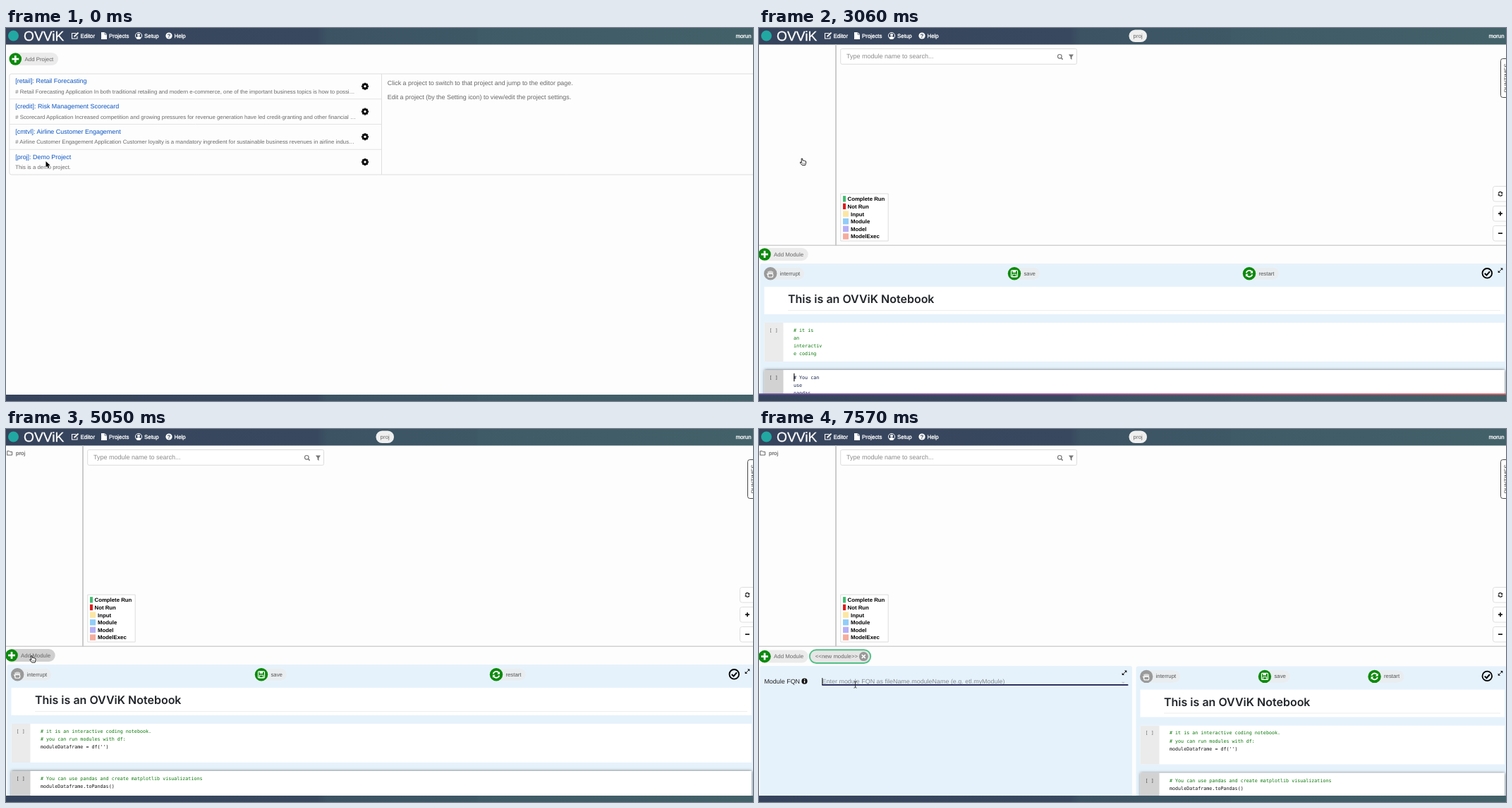
Recreate the animation shown at these times as an HTML page with a canvas. Size 1059 by 529 pixels, loop 8 s.

```html
<!DOCTYPE html>
<html lang="en">
<head>
<meta charset="utf-8">
<title>Project editor</title>
<style>
html, body { margin: 0; width: 100%; height: 100%; overflow: hidden; background: #fdfdfd; }
canvas { display: block; width: 1059px; height: 529px; }
</style>
</head>
<body>
<canvas id="stage"></canvas>
<script>
const W = 1059, H = 529, LOOP = 8000;
const SANS = '"Liberation Sans", sans-serif';
const MONO = '"DejaVu Sans Mono", monospace';
const BRAND = 'OVViK';
const GREEN = '#0b8a0b', PAGE = '#fdfdfd', PANEL = '#e6f2fb';

const canvas = document.getElementById('stage');
const c = canvas.getContext('2d');
const dpr = window.devicePixelRatio || 1;
canvas.width = W * dpr;
canvas.height = H * dpr;

// --- drawing helpers ---
function text(s, x, y, size, color, opt = {}) {
  c.font = `${opt.weight || 400} ${size}px ${opt.family || SANS}`;
  c.textAlign = opt.align || 'left';
  c.fillStyle = color;
  c.fillText(s, x, y);
  if (opt.medium) {
    c.strokeStyle = color;
    c.lineWidth = 0.3;
    c.strokeText(s, x, y);
  }
}
function rect(x, y, w, h, color) {
  c.fillStyle = color;
  c.fillRect(x, y, w, h);
}
function box(x, y, w, h, r, fill, stroke, lw = 1) {
  c.beginPath();
  c.roundRect(x, y, w, h, r);
  if (fill) { c.fillStyle = fill; c.fill(); }
  if (stroke) { c.strokeStyle = stroke; c.lineWidth = lw; c.stroke(); }
}
function disc(x, y, r, color) {
  c.beginPath();
  c.arc(x, y, r, 0, 7);
  c.fillStyle = color;
  c.fill();
}
function arc(x, y, r, color, lw, from = 0, to = Math.PI * 2) {
  c.beginPath();
  c.arc(x, y, r, from, to);
  c.strokeStyle = color;
  c.lineWidth = lw;
  c.stroke();
}
function line(points, color, lw = 1) {
  c.beginPath();
  points.forEach(([x, y], i) => i ? c.lineTo(x, y) : c.moveTo(x, y));
  c.strokeStyle = color;
  c.lineWidth = lw;
  c.stroke();
}
function poly(points, color) {
  c.beginPath();
  points.forEach(([x, y]) => c.lineTo(x, y));
  c.closePath();
  c.fillStyle = color;
  c.fill();
}
function at(x, y, draw) {
  c.save();
  c.translate(x, y);
  draw();
  c.restore();
}

// --- icons ---
function plus(x, y, r, color, lw) {
  line([[x - r, y], [x + r, y]], color, lw);
  line([[x, y - r], [x, y + r]], color, lw);
}
function gear(x, y, hole) {
  at(x, y, () => {
    for (let i = 0; i < 4; i++) {
      rect(-1.3, -5, 2.6, 10, '#000');
      c.rotate(Math.PI / 4);
    }
    disc(0, 0, 3.8, '#000');
    disc(0, 0, 1.7, hole);
  });
}
function refresh(x, y, r, color, lw) {
  at(x, y, () => {
    for (let i = 0; i < 2; i++) {
      arc(0, 0, r, color, lw, Math.PI * 1.08, Math.PI * 1.8);
      poly([[r * 1.15, -r], [r * 1.15, -r * .1], [r * .25, -r * .1]], color);
      c.rotate(Math.PI);
    }
  });
}
function expand(x, y) {
  line([[x - 2.5, y + 2.5], [x + 2.5, y - 2.5]], '#111', 1);
  poly([[x + 3.3, y - 3.3], [x + 3.3, y], [x, y - 3.3]], '#111');
  poly([[x - 3.3, y + 3.3], [x - 3.3, y], [x, y + 3.3]], '#111');
}
function hand(x, y) {
  at(x, y, () => {
    for (let i = 0; i < 4; i++) line([[-3 + i * 2, -4 + Math.abs(i - 1.5) * .6], [-3 + i * 2, 1]], '#fff', 1.2);
    line([[-5, 0], [-3, 2.5]], '#fff', 1.2);
    box(-3.6, 0, 7.2, 5, 2, null, '#fff', 1.1);
  });
}
function floppy(x, y) {
  box(x - 4.5, y - 4.5, 9, 9, 1, null, '#fff', 1.2);
  rect(x - 2.5, y - 4.5, 4.5, 3, '#fff');
  box(x - 2.6, y + .8, 5.2, 3.7, 0, null, '#fff', 1);
}

// --- pointers, placed by their hot spot ---
const pointers = {
  arrow() {
    c.beginPath();
    [[0, 0], [0, 8.6], [2, 6.8], [3.4, 9.8], [4.8, 9.1], [3.5, 6.3], [6.2, 6.1]].forEach(p => c.lineTo(...p));
    c.closePath();
    c.strokeStyle = '#fff';
    c.lineWidth = 1;
    c.stroke();
    c.fillStyle = '#000';
    c.fill();
  },
  hand() {
    c.beginPath();
    [[-.9, .2], [.6, .2], [1, 3], [3.2, 3.2], [5.4, 4], [5.6, 6], [4.6, 9.6], [.2, 9.6], [-2.6, 6.2], [-2.4, 5], [-.6, 6]]
      .forEach(p => c.lineTo(...p));
    c.closePath();
    c.fillStyle = '#fff';
    c.fill();
    c.strokeStyle = '#111';
    c.lineWidth = .9;
    c.lineJoin = 'round';
    c.stroke();
    for (let i = 0; i < 3; i++) line([[.6 + i * 1.4, 6], [.6 + i * 1.4, 8.2]], '#444', .5);
  },
  beam() {
    line([[0, -4], [0, 4]], '#222', .9);
    line([[-2, -4.8], [0, -4], [2, -4.8]], '#222', .8);
    line([[-2, 4.8], [0, 4], [2, 4.8]], '#222', .8);
  }
};

// --- timing ---
const lerp = (a, b, k) => a + (b - a) * k;
const ease = k => k * k * (3 - 2 * k);
const stepIndex = (t, times) => times.filter(s => t >= s).length;
const BAR_STEPS = [3810, 4010, 4160, 4310, 4460, 4600, 4750];
const LINK = [61, 185], ADD = [36.5, 321.5], FIELD = [136.5, 362.5];

function pointerAt(t) {
  if (t < 1560) return [56.5, 189];
  if (t < 2160) {
    const k = (Math.floor((t - 1560) / 150) + 1) / 5;
    return [lerp(56.5, 61, k), lerp(189, 185, k) - 37 * Math.sin(Math.PI * k)];
  }
  if (t < 3810) return LINK;
  if (t < 5500) {
    const k = ease(Math.max(0, stepIndex(t, BAR_STEPS) - 1) / 6);
    return LINK.map((v, i) => lerp(v, ADD[i], k));
  }
  const k = ease(Math.min(1, Math.floor((t - 5500) / 146.6) / 6));
  return ADD.map((v, i) => lerp(v, FIELD[i], k));
}

// --- shared bars ---
function barFill() {
  const g = c.createLinearGradient(0, 0, W, 0);
  [[0, '#36435c'], [.417, '#38495f'], [.43, '#3c5363'], [.63, '#3e5866'], [.632, '#3f5b67'], [1, '#436169']]
    .forEach(s => g.addColorStop(...s));
  return g;
}
function chrome() {
  const fill = barFill();
  rect(0, 0, W, 23.5, fill);
  rect(0, 520, W, 9, fill);
  disc(10.5, 11, 7.5, '#22a8a3');
  text(BRAND, 25, 17.7, 19.2, '#fff', { medium: true });
  const nav = [['Editor', 105.5], ['Projects', 146], ['Setup', 196], ['Help', 238.5]];
  nav.forEach(([s, x]) => text(s, x, 14, 7.9, '#fff', { medium: true }));
  line([[99.5, 7.5], [93.5, 7.5], [93.5, 15], [101, 15], [101, 11.5]], '#fff', 1.1);
  line([[96.5, 12.3], [102.5, 6.6]], '#fff', 2);
  poly([[135, 6], [140, 6], [143, 9], [143, 16], [135, 16]], '#fff');
  line([[140, 6], [140, 9.2], [143, 9.2]], '#3a4d60', .7);
  arc(188, 11, 4.6, '#fff', 1);
  disc(188, 9.7, 2, '#fff');
  c.beginPath();
  c.ellipse(188, 14, 3.2, 1.9, 0, 0, 7);
  c.fill();
  disc(231, 11, 4.6, '#fff');
  text('?', 231, 14, 8, '#394a60', { weight: 700, align: 'center' });
  text('morun', 1056.5, 14, 7.8, '#fff', { medium: true, align: 'right' });
}
function addPill(x, y, end, label, labelX, fill) {
  box(x - 8, y - 9, end - x + 8, 18, 9, fill);
  disc(x, y, 8.8, GREEN);
  plus(x, y, 4.9, '#fff', 2.7);
  text(label, labelX, y + 2.7, 7.9, '#666');
}

// --- project list ---
const projects = [
  ['[retail]: Retail Forecasting', 101.5, '# Retail Forecasting Application In both traditional retailing and modern e-commerce, one of the important business topics is how to possi…'],
  ['[credit]: Risk Management Scorecard', 147, '# Scorecard Application Increased competition and growing pressures for revenue generation have led credit-granting and other financial …'],
  ['[cmtvl]: Airline Customer Engagement', 150, '# Airline Customer Engagement Application Customer loyalty is a mandatory ingredient for sustainable business revenues in airline indus…'],
  ['[proj]: Demo Project', 79, 'This is a demo project.']
];
function listPage(t, [px, py]) {
  addPill(13.3, 44, 74, 'Add Project', 26.5, '#ebebeb');
  box(4.8, 65, 1060, 143, 3, null, '#dedede');
  let kind = 'arrow';
  projects.forEach(([title, width, note], i) => {
    const y = 65 + i * 35.75;
    const over = t >= 150 && py >= y && py < y + 35.75;
    const link = over && py > y + 4 && py < y + 15 && px < 13 + width;
    if (over) rect(5.5, y + .5, 526.5, 34.9, '#f2f7fb');
    if (i) line([[5, y], [532, y]], '#e3e3e3');
    text(title, 13.2, y + 13.4, 8.95, '#0b55c4');
    if (link) {
      kind = 'hand';
      rect(13.2, y + 14.3, width - .5, .8, '#0b55c4');
    }
    text(note, 13.2, y + 27.8, 7.82, '#6a6a6a');
    gear(509, y + 17.8, over ? '#f2f7fb' : PAGE);
  });
  line([[532.5, 65], [532.5, 208]], '#dedede');
  text('Click a project to switch to that project and jump to the editor page.', 540.8, 81, 8.92, '#666');
  text('Edit a project (by the Setting icon) to view/edit the project settings.', 540.8, 101.2, 8.92, '#666');
  return kind;
}

// --- editor ---
const legend = [['Complete Run', '#43bd72'], ['Not Run', '#dd1c1c'], ['Input', '#fce6a4'],
  ['Module', '#92ccf8'], ['Model', '#b5b0f6'], ['ModelExec', '#f5ac9d']];

function graphArea(t) {
  box(524.5, 2.5, 25.5, 17.5, 8.7, '#efefef');
  text('proj', 537.2, 14, 7.9, '#666', { align: 'center' });
  rect(108, 23.5, 2, 285, '#cbcbcb');
  rect(0, 307.6, W, 1.2, '#c6c6c6');
  if (t >= 3510) {
    line([[1.8, 37], [1.8, 31.2], [4.5, 31.2], [5.3, 32.3], [8.6, 32.3], [8.6, 37], [1.4, 37]], '#555', .9);
    text('proj', 14, 36.8, 7.9, '#333');
  }
  box(115.7, 29.5, 334.8, 21.8, 2, '#fff', '#dcdcdc');
  text('Type module name to search...', 124, 43.2, 9, '#8a8a8a');
  arc(426.3, 40.3, 2.8, '#777', 1.2);
  line([[428.3, 42.3], [430.6, 44.6]], '#777', 1.5);
  poly([[439, 37.5], [446, 37.5], [443.5, 41], [443.5, 45], [441.6, 43.4], [441.6, 41]], '#777');
  box(1051.5, 43.5, 14, 55, 3, '#fff', '#444');
  at(1062, 71, () => {
    c.rotate(-Math.PI / 2);
    text('RUNTIMES', 0, 0, 7.8, '#333', { align: 'center' });
  });
  for (let i = 0; i < 3; i++) box(1040.5, 224.5 + i * 28, 30, 21.5, 3, '#fff', '#dedede');
  refresh(1051, 235.3, 2.8, '#111', 1.2);
  plus(1051, 263.2, 3, '#111', 1.7);
  line([[1048, 291.2], [1054, 291.2]], '#111', 1.7);
  box(115.8, 235, 67.4, 67, 0, '#fff', '#dcdcdc');
  legend.forEach(([name, color], i) => {
    const y = 242.3 + i * 10.65;
    rect(119, y - 4.2, i < 2 ? 4 : 8, 8.4, color);
    text(name, i < 2 ? 125.5 : 130, y + 2.9, 7.8, '#000', { weight: 700 });
  });
}

function tool(x, y, end, label, color, icon) {
  box(x - 8, y - 8.5, end - x + 8, 17, 8.5, '#e9edf0');
  disc(x, y, 9.2, color);
  icon(x, y);
  text(label, x + 13.4, y + 2.5, 7.8, '#555');
}
function code(lines, x, y) {
  lines.forEach(([s, color], i) => text(s, x, y + i * 11.1, 6.7, color, { family: MONO }));
}
const COMMENT = '#0a780a', INK = '#111', NAVY = '#14204a';
const narrow = [
  ['# it is', 'an', 'interactiv', 'e coding'].map(s => [s, COMMENT]),
  ['# You can', 'use', 'pandas'].map(s => [s, NAVY])
];
const wide = [
  [['# it is an interactive coding notebook.', COMMENT], ['# you can run modules with df:', COMMENT], ["moduleDataframe = df('')", INK]],
  [['# You can use pandas and create matplotlib visualizations', COMMENT], ['moduleDataframe.toPandas()', INK]]
];

function notebook(x, y, t) {
  const cells = t < 3510 ? narrow : wide, right = 1057 - x;
  const third = x ? [368.2, 524] : [346, 679];
  c.save();
  c.beginPath();
  c.rect(0, 330, W, 190);
  c.clip();
  box(x + 1.5, 334 + y, W - x, 190, 3, PANEL);
  at(x, y, () => {
    tool(16.2, 348.3, 64, 'interrupt', '#9a9a9a', hand);
    tool(16.2 + (x ? 167.8 : 345.8), 348.3, (x ? 167.8 : 345.8) + 52, 'save', GREEN, floppy);
    tool(16.2 + (x ? 323.4 : 678.8), 348.3, (x ? 323.4 : 678.8) + 58, 'restart', GREEN, (a, b) => refresh(a, b, 4.4, '#fff', 1.9));
    arc(1032.3 - x, 347.8, 6.8, '#000', 1.8);
    line([[1028.8 - x, 348], [1031.5 - x, 350.6], [1036 - x, 345.4]], '#000', 2);
    expand(1051 - x, 343.8);

    rect(7.5, 367, right - 7.5, 39, '#fff');
    text(`This is an ${BRAND} Notebook`, 41, 390.3, 16, '#212529', { weight: 600, family: 'Inter, sans-serif' });
    rect(41, 400, right - 47, .9, '#ececec');

    rect(7.5, 418, right - 7.5, 55, '#fff');
    rect(7.5, 418, 27, 55, '#ebebeb');
    text('[ ]', 14.6, 430.8, 6.7, '#666', { family: MONO });
    code(cells[0], 49, 430.8);

    c.save();
    c.shadowColor = 'rgba(0,0,0,.6)';
    c.shadowBlur = 4 * dpr;
    rect(7.5, 485, right - 7.5, 50, '#fff');
    c.restore();
    rect(7.5, 485, 27, 50, '#d2d2d2');
    text('[ ]', 14.6, 498, 6.7, '#444', { family: MONO });
    code(cells[1], 49, 498);
    if (t < 4900) rect(49.3, 489.8, 1.1, 11.4, '#000');
  });
  c.restore();
}

function loadingBar(t) {
  const y = 518.3, h = 1.9;
  const g = c.createLinearGradient(0, 0, W, 0);
  if (t < 3510) {
    [[0, '#6a4c9c'], [.4, '#a04a96'], [.7, '#d2557c'], [1, '#e05a5f']].forEach(s => g.addColorStop(...s));
    rect(0, y, W, h, g);
    return;
  }
  const now = t < 3810 ? 3510 : BAR_STEPS[stepIndex(t, BAR_STEPS) - 1];
  const head = 950 - 303 * Math.exp(-.00274 * (now - 3510));
  g.addColorStop(0, '#6a4c9c');
  g.addColorStop(1, '#b650a0');
  rect(0, y, W, h, '#d9575c');
  rect(0, y, head, h, '#3fa577');
  rect(0, y, head - 214, h, g);
}

function moduleForm(t) {
  box(71.8, 313.2, 86.4, 18.8, 9.4, '#e6e6e6', '#52c088', 1.9);
  text('<<new module>>', 79.8, 325.3, 7.8, '#666');
  disc(148.3, 322.6, 6.5, '#999');
  line([[145.8, 320.1], [150.8, 325.1]], '#fff', 1.5);
  line([[150.8, 320.1], [145.8, 325.1]], '#fff', 1.5);

  box(1.3, 336, 527.7, 184, [3, 3, 0, 0], PANEL);
  expand(518, 345.8);
  text('Module FQN', 7.4, 360.8, 8.95, '#222');
  disc(64.5, 357.7, 4.1, '#111');
  rect(63.8, 357, 1.5, 3.2, '#fff');
  rect(63.8, 354.8, 1.5, 1.4, '#fff');
  text('Enter module FQN as fileName.moduleName (e.g. etl.myModule)', 89.6, 360.8, 8.95, '#858b90');
  poly([[513.8, 358.8], [518.8, 358.8], [516.3, 361.3]], '#c3cbd1');
  rect(89, 363, 435, .8, '#cfd9e0');
  if (t >= 6680) {
    const half = t < 6830 ? 150 : 217;
    rect(306.3 - half, 362, half * 2, 1.8, '#1d1f52');
    if (t < 7120 || t >= 7570) rect(89.3, 353, 1, 10, '#111');
  }
}

function editorPage(t, [px, py]) {
  const open = t >= 5500, y = open ? 322.6 : 321;
  const over = t >= 4900 && px < 70 && py > y - 9.5 && py < y + 9.5;
  graphArea(t);
  addPill(8, y, 69.7, 'Add Module', 21, over ? (t < 5050 ? '#dadada' : '#cfcfcf') : '#ebebeb');
  if (open) moduleForm(t);
  notebook(open ? 533 : 0, open ? 2.6 : 0, t);
  if (t < 4900) loadingBar(t);
  if (over || t < 4010) return 'hand';
  return open && px > 89 && py > 352 ? 'beam' : 'arrow';
}

function draw(t) {
  c.setTransform(dpr, 0, 0, dpr, 0, 0);
  c.textRendering = 'geometricPrecision';
  rect(0, 0, W, H, PAGE);
  const p = pointerAt(t);
  chrome();
  const kind = t < 3060 ? listPage(t, p) : editorPage(t, p);
  at(p[0], p[1], pointers[kind]);
}

const start = performance.now();
function tick() {
  draw((performance.now() - start) % LOOP);
  requestAnimationFrame(tick);
}
tick();
</script>
</body>
</html>
```
